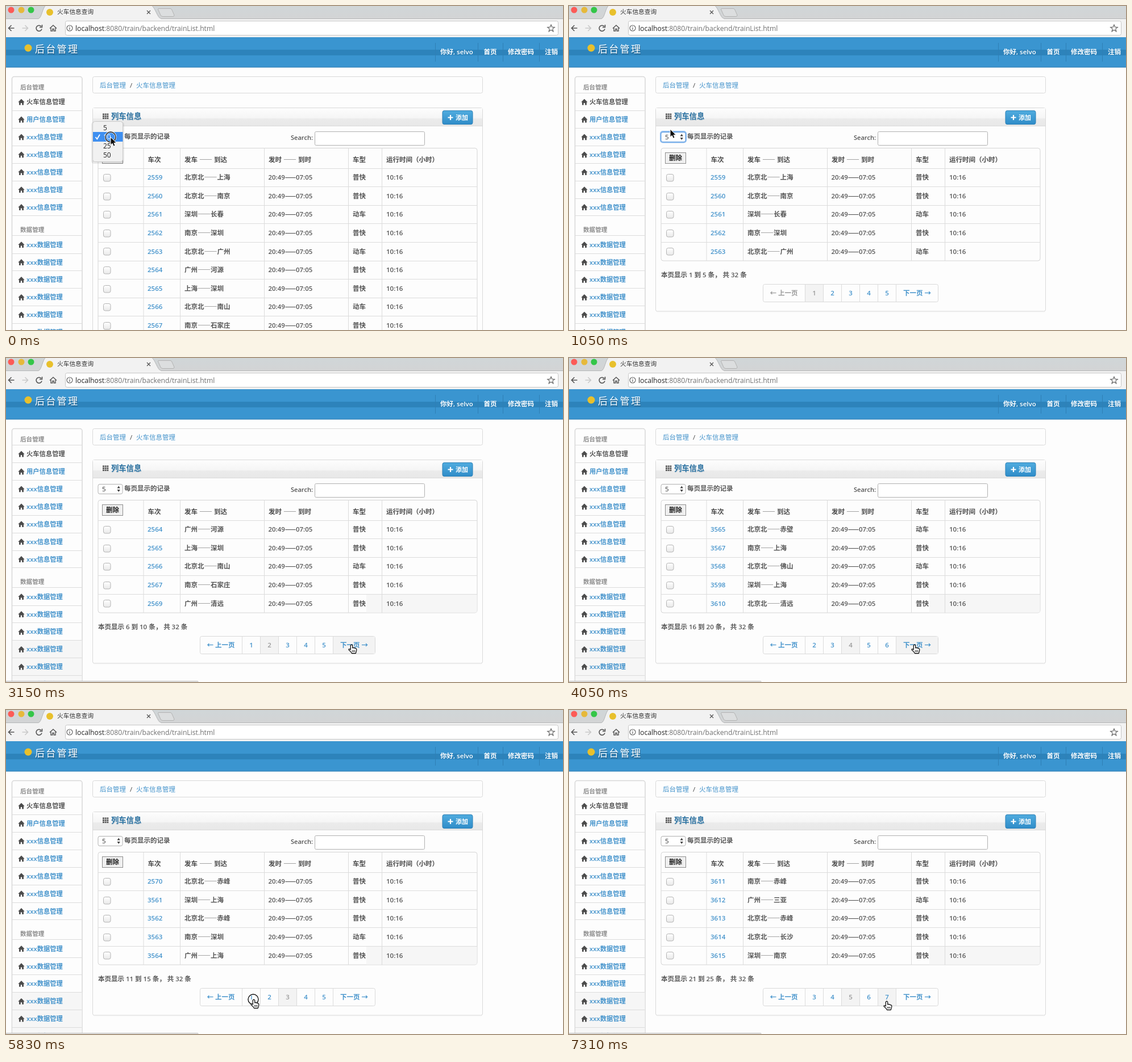
An HTML page for the animation above (8000 ms loop, 980 px wide and 571 px high).

```html
<!DOCTYPE html>
<html lang="zh-CN">
<head>
<meta charset="utf-8">
<title>火车信息查询</title>
<style>
html, body { margin: 0; width: 100%; height: 100%; overflow: hidden; background: #fdfdfd; }
svg { display: block; width: 980px; height: 571px; }
text { font: 400 11.5px "Open Sans", "Noto Sans CJK SC", "Noto Sans CJK JP", sans-serif; white-space: pre; text-spacing-trim: space-all; }
.b { font-weight: 600; }
.m { font-weight: 500; }
.dash { font-family: "Noto Sans CJK SC", "Noto Sans CJK JP", sans-serif; }
</style>
</head>
<body>
<svg id="stage" viewBox="0 0 980 571">
  <defs>
    <linearGradient id="bar" x2="0" y2="1"><stop stop-color="#d0d6d8"/><stop offset="1" stop-color="#d3d4d5"/></linearGradient>
    <linearGradient id="head" x2="0" y2="1"><stop stop-color="#fdfdfd"/><stop offset=".55" stop-color="#f5f5f5"/><stop offset=".6" stop-color="#ebebeb"/><stop offset="1" stop-color="#e8e8e8"/></linearGradient>
    <linearGradient id="btn" x2="0" y2="1"><stop stop-color="#50acdf"/><stop offset="1" stop-color="#2f8cc8"/></linearGradient>
    <linearGradient id="box" x2="0" y2="1"><stop stop-color="#fff"/><stop offset="1" stop-color="#e9e9e9"/></linearGradient>
  </defs>
  <g id="page"></g>
  <g id="live"></g>
</svg>
<script>
const LOOP = 8000;
const BLUE = '#4292cb', GREY = '#555', LINE = '#dcdcdc', TINT = '#f6f6f6';
const COLS = [162, 242, 306.5, 454.5, 602.5, 661.5, 829];
const CELLS = [341.5, 415.5, 447.5, 479.5, 511.5, 543.5, 575.5, 649.5];
const DASH = '<tspan class="dash">——</tspan>';

// number, from, to; a star marks the fast type
const TRAINS = `2559 北京北 上海,2560 北京北 南京,2561 深圳 长春 *,2562 南京 深圳,2563 北京北 广州 *,
2564 广州 河源,2565 上海 深圳,2566 北京北 南山 *,2567 南京 石家庄,2569 广州 清远,
2570 北京北 赤峰,3561 深圳 上海,3562 北京北 赤峰,3563 南京 深圳 *,3564 广州 上海,
3565 北京北 赤壁 *,3567 南京 上海,3568 北京北 佛山 *,3598 深圳 上海,3610 北京北 清远,
3611 南京 赤峰,3612 广州 三亚 *,3613 北京北 赤峰,3614 北京北 长沙,3615 深圳 南京`
  .split(',').map(s => s.trim().split(' '));

// time, pointer x, y, click ring
const POINTER = [
  [0, 184, 231, 1], [150, 184, 231], [300, 181, 224], [450, 178, 217], [600, 178, 217, 1], [900, 178, 217],
  [1500, 262, 262], [1650, 430, 345], [1800, 590, 425], [1950, 686, 459],
  [2250, 650, 445], [2400, 585, 508], [2550, 558, 521], [2700, 588, 512], [2850, 607, 505],
  [3000, 607, 505, 1], [3150, 607, 505], [3450, 607, 505, 1], [3600, 607, 505],
  [3900, 607, 505, 1], [4050, 607, 505], [4500, 607, 505, 1], [4650, 607, 505],
  [5100, 590, 507], [5250, 548, 510], [5400, 497, 511], [5550, 455, 511], [5690, 435, 510],
  [5830, 435, 510, 1], [5980, 435, 510],
  [6270, 442, 512], [6420, 468, 514], [6570, 505, 514], [6720, 536, 513], [6865, 553, 513], [7015, 558, 513],
  [7160, 558, 513, 1], [7310, 558, 513]
];
const PAGES = [[0, 1], [3000, 2], [3450, 3], [3900, 4], [4500, 5], [5830, 3], [7160, 5]];

const at = (list, t) => list.filter(k => k[0] <= t).pop();
const text = (x, cy, s, fill = GREY, cls = 'b', size = 11.5, more = '') =>
  `<text x="${x}" y="${cy + size * .37}" fill="${fill}" class="${cls}" style="font-size:${size}px" ${more}>${s}</text>`;
const rect = (x, y, w, h, fill, stroke = 'none', r = 0, more = '') =>
  `<rect x="${x}" y="${y}" width="${w}" height="${h}" rx="${r}" fill="${fill}" stroke="${stroke}" ${more}/>`;
const path = (d, stroke, fill = 'none', more = '') => `<path d="${d}" stroke="${stroke}" fill="${fill}" ${more}/>`;
const disc = (x, y, r, fill, more = '') => `<circle cx="${x}" cy="${y}" r="${r}" fill="${fill}" ${more}/>`;
const mid = 'text-anchor="middle"';

function browser() {
  const thick = 'stroke-width="1.6"';
  return rect(0, 0, 980, 22, 'url(#bar)') + rect(0, 22, 980, 33, '#f2f2f2') +
    path('M0 22.5H57C63 21 64 3 70 -1H256C263 3 266 21 273 22.5H980', '#b4b6b7', '#f2f2f2') +
    rect(58, 22, 214, 2, '#f2f2f2') +
    path('M269 4.5H289Q291 4.5 292 7L296 16Q296 18.5 294 18.5H276Q273 18.5 272 16L267.5 6Q267 4.5 269 4.5Z', '#b3b3b3', '#dcdedf') +
    disc(9, 7, 5.5, '#fc5b57') + disc(27, 7, 5.5, '#e6b93a') + disc(44, 7, 5.5, '#34c648') +
    disc(77, 11, 6, '#e8c02c') +
    text(90, 10.5, '火车信息查询', '#333', 'm', 10.7) +
    path('M248 8l6 6m0-6l-6 6', '#555', 'none', 'stroke-width="1.3"') +
    path('M14.5 39H4.5m5-5l-5 5 5 5', '#555', 'none', thick) +
    path('M28.5 39h10m-5-5l5 5-5 5', '#c9c9c9', 'none', thick) +
    path('M62 36A5 5 0 1 0 63 40.5M63.5 33v4.5h-4.5', '#555', 'none', thick) +
    path('M77 39.5L83 34l6 5.5M79 38.5v5.5h2.8v-3.5h2.4v3.5H87v-5.5', '#555', 'none', 'stroke-width="1.4"') +
    rect(104.5, 26.5, 867, 25, '#fff', '#c6c6c6', 3) +
    disc(112, 39, 5, 'none', 'stroke="#666" stroke-width="1.2"') + path('M112 38v4m0-6.3v1.3', '#666', 'none', 'stroke-width="1.2"') +
    text(122, 39, 'localhost<tspan fill="#707070">:8080/train/backend/trainList.html</tspan>', '#222', '', 12.2) +
    path('M959 33l1.7 4.2 4.5.3-3.5 2.9 1.2 4.4-3.9-2.5-3.9 2.5 1.2-4.4-3.5-2.9 4.5-.3z', '#666', 'none', 'stroke-width="1.2"');
}

function banner() {
  const nav = [[764, '你好, selvo'], [840.5, '首页'], [883, '修改密码'], [948, '注销']];
  const title = (x, y, fill) => text(x, y, '后台管理', fill, 'm', 17, 'letter-spacing="2.3"');
  return rect(0, 55, 980, 53, '#3a95d0') + rect(0, 77, 980, 10, '#2d83bb') + rect(0, 107, 980, 1.5, '#3586bc') +
    disc(39, 74, 6.5, '#e8c02c') + title(52, 77.5, '#24648f') + title(51, 76, '#fff') +
    [755.5, 830.5, 874.5, 938.5].map(x => path(`M${x} 65V98`, '#2f80b6')).join('') +
    nav.map(([x, s]) => text(x, 81, s, '#fff')).join('');
}

function sidebar() {
  const home = cy => path(`M21.3 ${cy + .5}l5.7-5.8 5.7 5.8h-1.7v5h-2.8v-3.5h-2.4v3.5h-2.8v-5z`, 'none', '#4c4c4c');
  const row = (cy, s, fill) => home(cy) + text(36, cy, s, fill, 'b', 11.3) + path(`M11 ${Math.round(cy + 15) + .5}H133.5`, LINE);
  let out = rect(10.5, 124.5, 123.5, 480, '#fdfdfd', '#d8d8d8', 4, 'stroke-width="1.5"') +
    text(25, 143, '后台管理', '#8c8c8c', 'b', 10.6) + path('M11 153.5H133.5M11 404.5H133.5', LINE) +
    text(25, 394, '数据管理', '#8c8c8c', 'b', 10.6) +
    '<g id="shade"></g>';
  for (let i = 0; i < 7; i++)
    out += row(169 + i * 30.9, ['火车信息管理', '用户信息管理'][i] || 'xxx信息管理', i ? BLUE : GREY);
  for (let i = 0; i < 6; i++) out += row(420.5 + i * 30.9, 'xxx数据管理', BLUE);
  return out;
}

function panel(rows) {
  const bottom = rows > 5 ? 640 : 538;
  let grid = '';
  for (let i = 0; i < 9; i++) grid += rect(170 + i % 3 * 3.7, 189.5 + Math.floor(i / 3) * 3.5, 2.9, 2.7, '#555');
  return rect(152.5, 179.5, 686, bottom - 179.5, '#fdfdfd', '#d9d9d9', 3) +
    path(`M154 ${bottom + .8}H837`, '#ececec') +
    rect(153, 180, 685, 31.5, 'url(#head)') + path('M152.5 211.5H838.5', '#d9d9d9') +
    grid + text(185.5, 195.5, '列车信息', '#c3ccd2', 'b', 13.3) + text(185, 194.5, '列车信息', '#2f76a6', 'b', 13.3) +
    rect(768, 184.5, 53, 24, 'url(#btn)', '#2c80b6', 3) +
    path('M777.5 196.5h9m-4.5-4.5v9', '#fff', 'none', 'stroke-width="2.2"') + text(791, 196.5, '添加', '#fff', 'b', 11) +
    text(208, 229.5, '每页显示的记录') +
    text(540, 232, 'Search:', GREY, 'b', 11.1, 'text-anchor="end"') +
    rect(543.5, 221.5, 193, 24, '#fff', '#b0b0b0', 2);
}

function table(page, rows, t) {
  const y0 = 286, pitch = 32.6, end = y0 + pitch * rows;
  const from = (page - 1) * 5;
  let out = rect(162, 250.5, 667, end - 250.5, '#fdfdfd', '#d5d5d5', 4);
  if (t >= 2250) {
    const x = t < 3000 ? 162.5 : 634;
    out += rect(x, 417, 828.5 - x, 31.5, TINT);
  }
  out += COLS.slice(1, -1).map(x => path(`M${x} 250.5V${end}`, LINE)).join('');
  ['车次', `发车 ${DASH} 到达`, `发时 ${DASH} 到时`, '车型', '运行时间（小时）']
    .forEach((s, i) => out += text(COLS[i + 1] + 7.5, 271, s, '#4b4b4b'));
  out += rect(169.5, 258.5, 36, 19, '#f0f0f0', '#8d8d8d') + text(176, 268, '删除', '#222');
  for (let i = 0; i < rows; i++) {
    const [no, a, b, fast] = TRAINS[from + i], cy = 302 + i * pitch;
    out += path(`M162 ${Math.floor(y0 + i * pitch) + .5}H829`, LINE) +
      rect(171.5, Math.round(cy) - 5.5, 12.5, 12.5, 'url(#box)', '#b3b3b3', 3) +
      text(249, cy, no, BLUE) + text(314, cy, a + DASH + b) + text(461.5, cy, `20:49${DASH}07:05`, GREY, 'b', 11.4) +
      text(610, cy, fast ? '动车' : '普快') + text(669, cy, '10:16');
  }
  return out;
}

function pager(page, cell, ring) {
  const first = Math.max(1, page - 2);
  const filled = (i, n) => i > 0 && i < 6 && n === page || i === cell && !(ring && i < 6);
  let out = text(162, 473.5, `本页显示 ${page * 5 - 4} 到 ${page * 5} 条， 共 32 条`) +
    rect(341.5, 490.5, 308, 31, '#fdfdfd', '#d9d9d9', 3);
  for (let i = 0; i < 7; i++) {
    const x = CELLS[i], w = CELLS[i + 1] - x, n = first + i - 1;
    if (filled(i, n)) out += rect(x + .5, 491, w - 1, 30, '#f3f3f3');
    if (i) out += path(`M${x} 490.5V521.5`, LINE);
    if (i > 0 && i < 6) out += text(x + w / 2, 506, n, n === page ? '#999' : BLUE, 'b', 11.5, mid);
  }
  return out + text(378, 506, '← 上一页', page === 1 ? '#999' : BLUE, 'b', 11.5, mid) + text(612.5, 506, '下一页 →', BLUE, 'b', 11.5, mid);
}

function select(t) {
  const focus = t >= 750 && t < 3000;
  return (focus ? rect(161.5, 221.5, 44, 18.5, '#fff', '#8fbdf0', 3.5, 'stroke-width="3"') : '') +
    rect(162, 222.5, 43, 17, '#fff', focus ? '#5b9be0' : '#b0b0b0', 3) +
    text(169, 230.5, t < 750 ? '10' : '5', '#333', '') +
    path('M195.5 229.5l2.7-4 2.7 4zM195.5 232l2.7 4 2.7-4z', 'none', '#444');
}

function menu(t) {
  const hot = t < 300 ? 1 : 0;
  let out = rect(150, 204, 58, 74, '#000', 'none', 5, 'opacity=".08"') + rect(152.5, 203.5, 53, 71, '#f1f1f1', '#c9c9c9', 4) +
    rect(153, 206 + hot * 16, 52.5, 17, '#3f8ff0');
  ['5', '10', '25', '50'].forEach((s, i) => out += text(171, 214.5 + i * 15.9, s, i === hot ? '#fff' : '#222', 'm', 12));
  return out + path('M157.5 231l2.8 3.5 4.7-8', hot ? '#fff' : '#222', 'none', 'stroke-width="1.8"');
}

function pointer(x, y, ring, hand) {
  const halo = ring ? disc(0, 0, 9, 'none', 'stroke="#fff" stroke-width="3"') + disc(0, 0, 9, 'none', 'stroke="#111" stroke-width="1.4"') : '';
  const shape = hand
    ? path('M-.7 1.5Q1-1 2.7 1.5V6Q4 4.7 5.2 6.2Q6.6 5.3 7.6 7Q9.8 6.5 9.8 9Q9.8 12 8.2 15.5H1.5Q-.5 12-3.8 9.5Q-4.5 6.5-.7 9Z', '#111', '#fff', 'stroke-width="1.3" stroke-linejoin="round"') +
      path('M2.3 10v3m2.2-3v3m2.2-3v3', '#111')
    : path('M0 0V14.2L3.2 11.2L5.4 16.2L8 15L5.9 10.3H10.2Z', '#fff', '#0a0a0a');
  return `<g transform="translate(${x} ${y})">${halo}${shape}</g>`;
}

const page = document.getElementById('page'), live = document.getElementById('live');
page.innerHTML = browser() + banner() + sidebar() +
  rect(152.5, 124.5, 686, 29, '#fdfdfd', '#d9d9d9', 3) +
  text(165, 139.5, '后台管理', BLUE, '') + text(218, 139.5, '/', '#444', '') + text(229, 139.5, '火车信息管理', BLUE, '');
const shade = document.getElementById('shade');

function draw(t) {
  const [, x, y, ring] = at(POINTER, t), current = at(PAGES, t)[1];
  const rows = t < 750 ? 10 : 5;
  const over = y > 490 && y < 521 ? CELLS.findIndex((c, i) => x >= c && x < CELLS[i + 1]) : -1;
  shade.innerHTML = t >= 2400 ? rect(11.5, 497, 122, 74, TINT) : '';
  live.innerHTML = panel(rows) + select(t) + table(current, rows, t) +
    (rows === 5 ? pager(current, over, ring) : '') +
    (t < 750 ? menu(t) : '') +
    (t >= 2400 ? rect(0, 569.5, 338, 2, '#ececec', '#bcbcbc', 1) : '') +
    pointer(x, y, ring, over >= 0);
}

// redraw only when a new step begins
const STEPS = [...POINTER, ...PAGES, [750]].map(k => k[0]);
let shown = -1;
function tick(now) {
  const t = now % LOOP, step = Math.max(...STEPS.filter(s => s <= t));
  if (step !== shown) draw(shown = step);
  requestAnimationFrame(tick);
}
draw(0);
requestAnimationFrame(tick);
</script>
</body>
</html>
```
